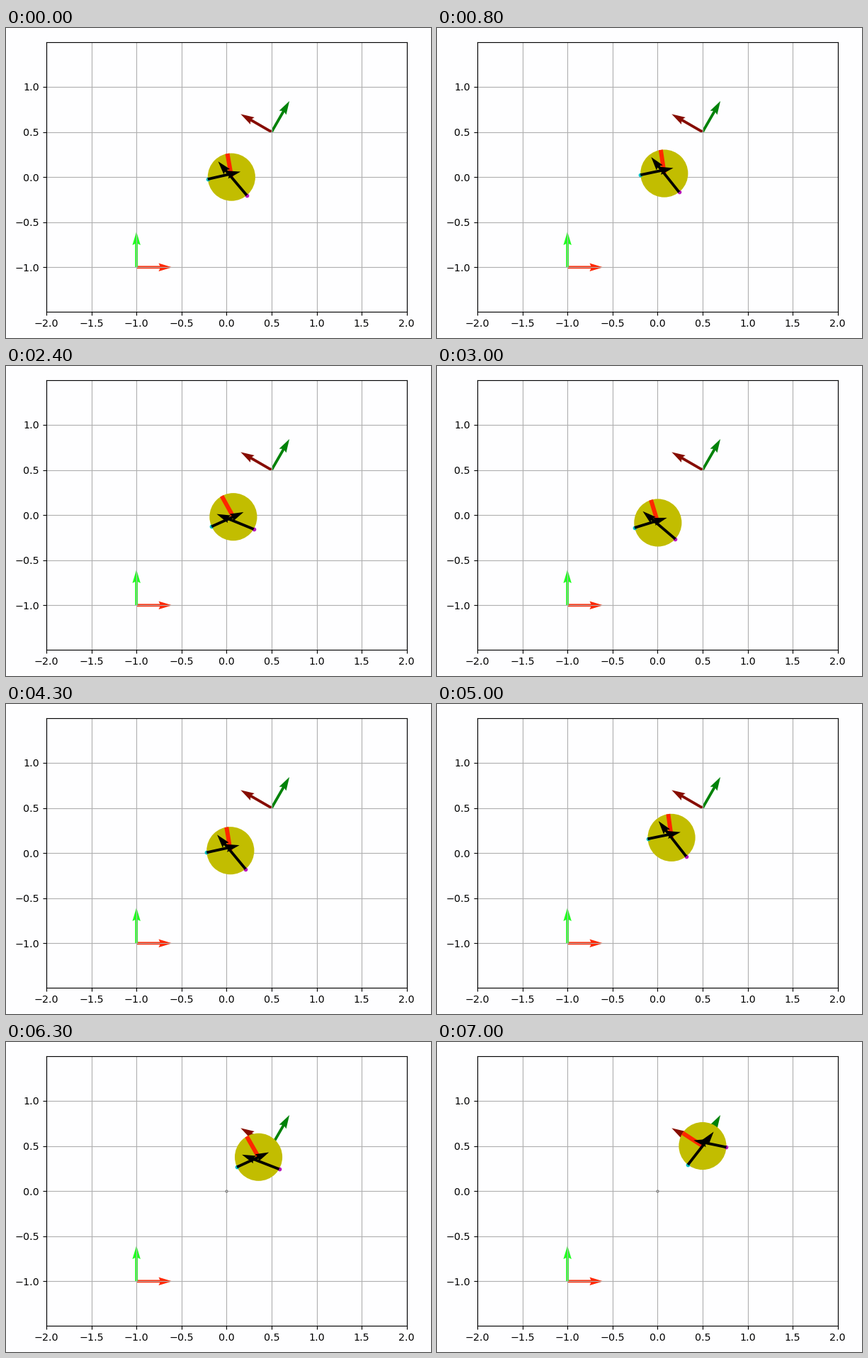
Write a matplotlib script that moves like this. It is 600 px wide and 437 px high and loops after 7100 ms.

```python
import numpy as np
import matplotlib.pyplot as plt
from matplotlib.animation import FuncAnimation
from matplotlib.patches import Circle

W, H, DPI = 600, 437, 100
FRAMES, INTERVAL = 71, 100
SCALE = 1.026          # line and text scale against the defaults
RADIUS = 0.264
CONTACTS = np.array([85, 210])   # contact angles, relative to heading
REST, GOAL = 97, 147             # heading at rest and at the goal

# waypoints of the disc: time, x, y, heading
PATH = np.array([
    (0.0, 0.055, 0.000, 100),
    (1.6, 0.094, 0.080, REST),
    (2.4, 0.075, -0.020, 119),
    (3.0, 0.004, -0.085, 107),
    (4.3, 0.043, 0.027, 99.5),
    (5.7, 0.235, 0.274, REST),
    (7.0, 0.500, 0.500, GOAL),
])
PAUSES = [(2.4, 2.8), (3.3, 3.6), (5.2, 5.4), (6.2, 6.4)]

plt.rcParams.update({
    "font.family": "DejaVu Sans", "font.size": 10 * SCALE,
    "axes.linewidth": 0.8 * SCALE, "grid.linewidth": 0.8 * SCALE,
})


def unit(deg):
    a = np.radians(deg)
    return np.array([np.cos(a), np.sin(a)])


def active_time(t):
    """Running time without the pauses."""
    return t - sum(np.clip(t - a, 0, b - a) for a, b in PAUSES)


def pose_at(t):
    s, keys = active_time(t), active_time(PATH[:, 0])
    return [np.interp(s, keys, column) for column in PATH[:, 1:].T]


def forces_at(heading):
    """Push along the inward normals, tilted and scaled by the turn made."""
    turn = (heading - REST) / (GOAL - REST)
    tilt = [9 * max(0, 1 - 2.2 * turn), 20 * turn * np.sin(3.6 * turn)]
    size = [0.93 + 0.23 * turn ** 2, 1.25 - 0.32 * turn]
    return unit(heading + CONTACTS + 180 + tilt) * size


fig = plt.figure(figsize=(W / DPI, H / DPI), dpi=DPI, facecolor="#fefeff")
left, top, width, height = 57, 20.45, 508.7, 379.4
ax = fig.add_axes([left / W, 1 - (top + height) / H, width / W, height / H],
                  facecolor="#fefeff")
ax.set_xlim(-2, 2)
ax.set_ylim(-2 * height / width, 2 * height / width)
ax.set_xticks(np.arange(-2, 2.1, 0.5))
ax.set_yticks(np.arange(-1, 1.1, 0.5))
ax.tick_params(length=3.5 * SCALE, width=0.8 * SCALE, pad=3.5 * SCALE)
ax.grid(True)


def draw_frame(x, y, angle, x_color, y_color):
    for deg, color in ((angle, x_color), (angle + 90, y_color)):
        u, v = unit(deg)
        ax.quiver([x], [y], [u], [v], color=color, scale=10.1)


draw_frame(-1, -1, 0, "#ff2600", "#1fff1f")
draw_frame(0.5, 0.5, 60, "#008209", "#860c00")
ax.plot(0, 0, "o", ms=2.2, mfc="#d0d0d0", mec="#707070", mew=0.7, zorder=2)

disc = ax.add_patch(Circle((0, 0), RADIUS, color="#c2bd00", lw=0, zorder=4))
heading_line, = ax.plot([], [], color="#ff2600", lw=4.2 * SCALE,
                        solid_capstyle="butt", zorder=5)
dots = [ax.plot([], [], ".", color=c, ms=6 * SCALE, zorder=6)[0]
        for c in ("#00bfc4", "#b818bd")]
forces = ax.quiver([0, 0], [0, 0], [1, 1], [0, 0], color="black",
                   scale=10, zorder=7)


def update(i):
    x, y, heading = pose_at(i * INTERVAL / 1000)
    center = np.array([x, y])
    disc.center = (x, y)
    end = center + RADIUS * unit(heading)
    heading_line.set_data([x, end[0]], [y, end[1]])

    points = center + RADIUS * unit(heading + CONTACTS).T
    for dot, (px, py) in zip(dots, points):
        dot.set_data([px], [py])
    forces.set_offsets(points)
    forces.set_UVC(*forces_at(heading))
    return [disc, heading_line, *dots, forces]


anim = FuncAnimation(fig, update, frames=FRAMES, interval=INTERVAL,
                     repeat=True, repeat_delay=0, blit=False)
plt.show()
```
